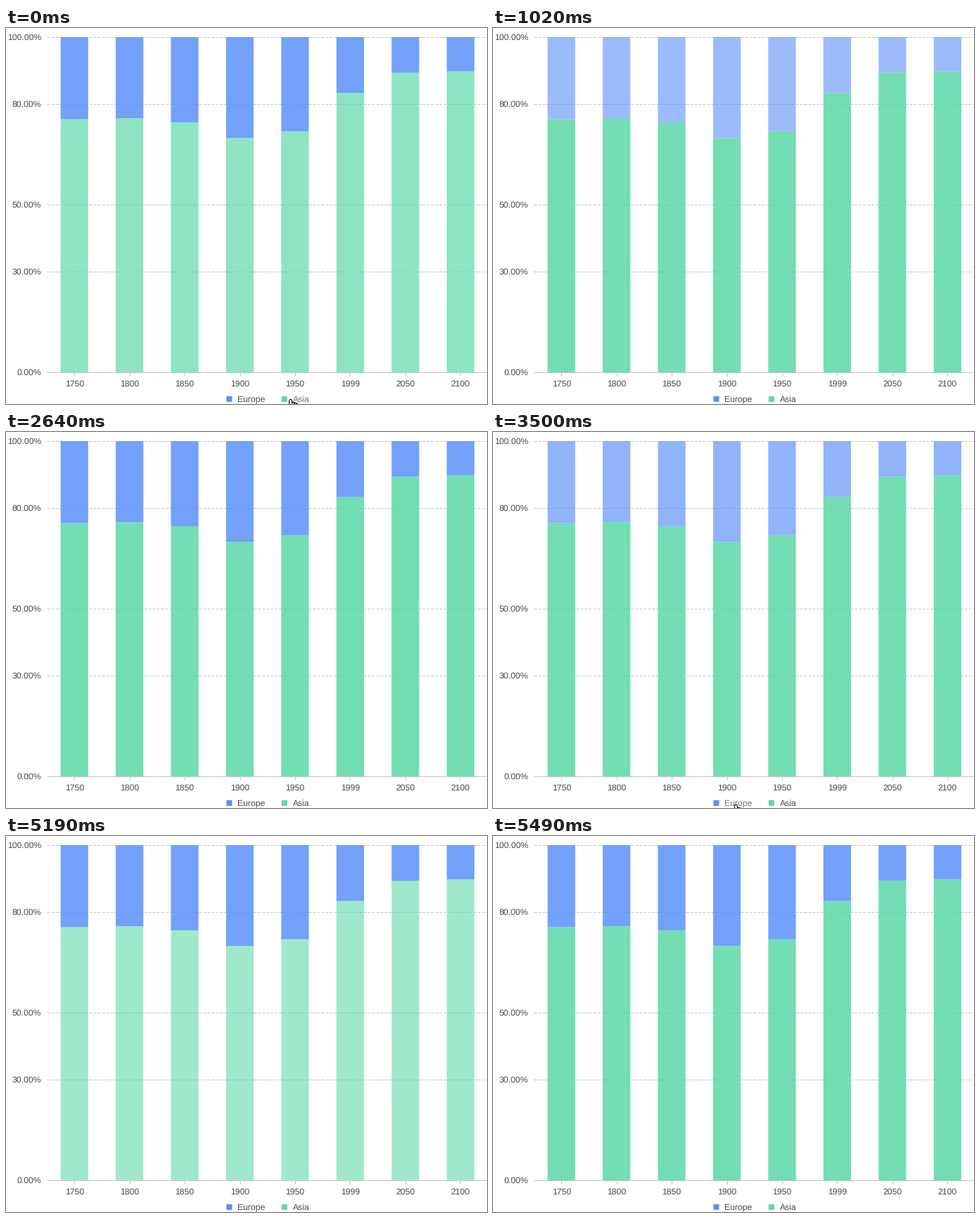
A matplotlib script for the animation above (6.34 s loop, 684x534 px).

```python
import numpy as np
import matplotlib.pyplot as plt
from matplotlib.animation import FuncAnimation
from matplotlib.patches import Polygon, Rectangle

W, H, DPI = 684, 534, 64
LOOP, STEP = 6340, 20
PX = 72 / DPI  # points per pixel

INK, DIM, RULE = "#4a4a4a", "#727272", "#c2c2c2"
LEFT, TOP, BASE = 58, 13, 489
SLOT = 78.45

YEARS = [1750, 1800, 1850, 1900, 1950, 1999, 2050, 2100]
ASIA_SHARE = [0.755, 0.758, 0.746, 0.699, 0.719, 0.833, 0.8935, 0.8977]

plt.rcParams["font.family"] = "Liberation Sans"
plt.rcParams["text.hinting"] = "none"

fig = plt.figure(figsize=(W / DPI, H / DPI), dpi=DPI, facecolor="white")
ax = fig.add_axes([0, 0, 1, 1])
ax.set_xlim(0, W)
ax.set_ylim(H, 0)
ax.axis("off")


def label(x, cy, text, ha):
    return ax.text(x, cy + 4, text, ha=ha, va="baseline",
                   size=12.2 * PX, color=INK, zorder=4)


def rule(xs, ys, style="-"):
    ax.plot(xs, ys, color=RULE, lw=PX, ls=style, zorder=1,
            solid_capstyle="butt", dash_capstyle="butt")


def box(x, y, w, h, color, z=2):
    return ax.add_patch(Rectangle((x, y), w, h, fc=color, lw=0,
                                  snap=False, zorder=z))


class Series:
    """Legend entry with its bars, fade level and pointer rest position."""

    def __init__(self, name, color, x, rest, faded):
        self.color, self.rest, self.faded = color, rest, faded
        self.bars = []
        box(x, 523, 8, 8, color, 3)
        self.text = label(x + 15.5, 527, name, "left")

    def add_bar(self, cx, top, bottom):
        self.bars.append(box(cx - SLOT / 4, top, SLOT / 2, bottom - top,
                             self.color))

    def paint(self, fade, hovered):
        self.text.set_color(DIM if hovered else INK)
        for bar in self.bars:
            bar.set_alpha(0.85 + (self.faded - 0.85) * fade)


europe = Series("Europe", "#5B8FF9", 313.5, (345.5, 529.3), 0.6)
asia = Series("Asia", "#5AD8A6", 392, (412, 528), 0.575)

for share in (1, 0.8, 0.5, 0.3, 0):
    y = round(BASE - share * (BASE - TOP))
    rule([LEFT, W], [y - 0.5] * 2, (0, (4, 2)) if share else "-")
    label(50, y, f"{share:.2%}", "right")

for i, (year, share) in enumerate(zip(YEARS, ASIA_SHARE)):
    cx = LEFT + SLOT * (i + 0.5)
    split = BASE - (BASE - TOP) * share
    europe.add_bar(cx, TOP, split)
    asia.add_bar(cx, split, BASE)
    rule([cx, cx], [BASE, BASE + 5])
    label(cx, 505, str(year), "center")

# Pointing hand: rounded thumb and fingers, index fingertip at the origin
DIGITS = [(-3.8, 8.7, 1.3), (0, 1.9, 1.9), (3.8, 5.6, 1.6),
          (6.9, 6.4, 1.6), (9.8, 7.8, 1.5)]
turn = np.linspace(np.pi, 0, 9)
arcs = [np.c_[x + r * np.cos(turn), y - r * np.sin(turn)]
        for x, y, r in DIGITS]
arcs.insert(1, [(-1.9, 9)])
HAND = np.vstack(arcs + [[(11, 13), (9, 17), (1, 17)]])
hand = ax.add_patch(Polygon(HAND, fc="white", ec="black", lw=1.1 * PX,
                            joinstyle="round", zorder=6))

# Pointer visits: series, enter, fully faded, leave, fade cleared
VISITS = [
    (asia, -600, -300, 240, 60),
    (europe, 300, 630, 1020, 1270),
    (asia, 1810, 2070, 2400, 2560),
    (europe, 3270, 3560, 3860, 4130),
    (asia, 4550, 4840, 5190, 5490),
]
GLIDE = 440                     # opening move from one entry to the other
FADE_IN, HALF_WAY = 170, 130    # smooth fade, then a two-step return


def ramp(t, start, length):
    return min(max((t - start) / length, 0), 1)


def fade_at(t, full, clear):
    if t >= clear:
        return 0
    if t >= clear - HALF_WAY:
        return 0.6
    return ramp(t, full - FADE_IN, FADE_IN)


def pointer(t):
    if t < GLIDE:
        s = t / GLIDE
        return 406 - 60.5 * s, 527 + 2.3 * s + 3.6 * np.sin(np.pi * s)
    for series, enter, _, leave, _ in VISITS:
        if enter <= t < leave:
            x, y = series.rest
            sunk = 1 - ramp(t, enter - 60, 140) + ramp(t, leave - 150, 150)
            return x, y + 7 * sunk
    return None


def draw(i):
    t = i * STEP + STEP / 2
    for series in (europe, asia):
        mine = [v for v in VISITS if v[0] is series]
        fade = max(fade_at(t, full, clear) for _, _, full, _, clear in mine)
        hovered = any(enter <= t < leave for _, enter, _, leave, _ in mine)
        series.paint(fade, hovered)
    tip = pointer(t)
    hand.set_visible(tip is not None)
    if tip is not None:
        hand.set_xy(HAND + tip)
    return []


anim = FuncAnimation(fig, draw, frames=LOOP // STEP, interval=STEP,
                     repeat=True, repeat_delay=0, blit=False)
plt.show()
```
